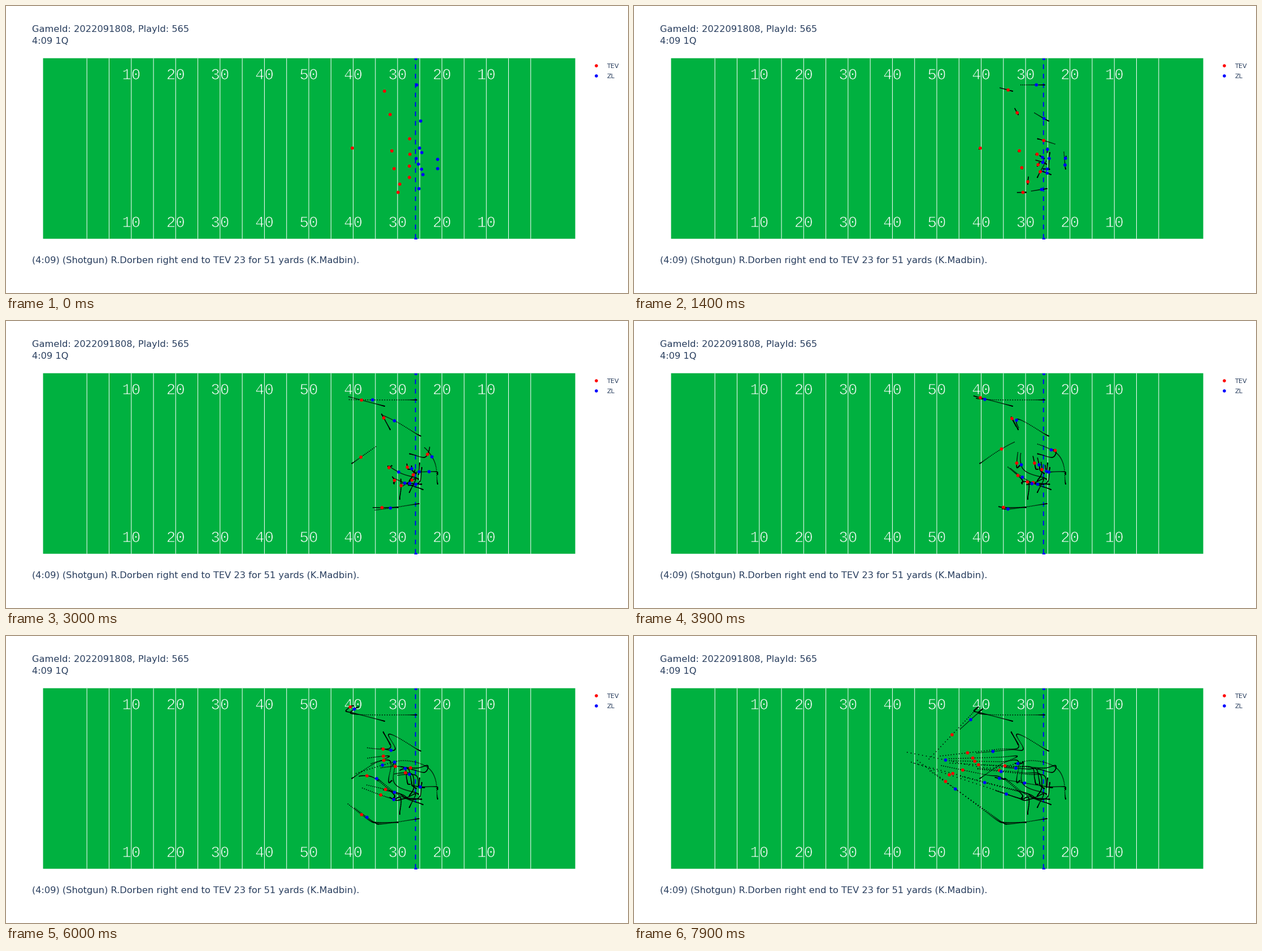
These frames come from a looping animation (1101x509 px, 8000 ms). A matplotlib script:

```python
import numpy as np
import matplotlib.pyplot as plt
from matplotlib.animation import FuncAnimation
from matplotlib.patches import Rectangle
from matplotlib.patheffects import Stroke

W, H, DPI = 1101, 509, 100
PX = 72 / DPI
FRAMES, SNAP, AHEAD = 80, 11, 10
RED, BLUE, INK, TURF = "#ff0000", "#0000ff", "#2a3f5f", "#00b140"
LEFT, RIGHT, TOP, BOTTOM = 65.6, 1007.6, 92.6, 412.8
MIDFIELD, FIVE_YARDS = 536, 39.28
SCRIMMAGE = 724.8
FINISH = np.array([551.5, 220])  # where the ball carrier ends up
LANE = np.array([1, 0.65])       # pursuers partly keep their lane
GAP = np.array([4, 1.5])         # half the space between two blockers

players = []


def hermite(knots):
    """Smooth path through {frame: (x, y)}, starting from rest."""
    t = np.array(sorted(knots), float)
    p = np.array([knots[k] for k in sorted(knots)], float)
    m = np.gradient(p, t, axis=0)
    m[0] = 0
    f = np.arange(FRAMES)
    i = np.clip(np.searchsorted(t, f, side="right") - 1, 0, len(t) - 2)
    h = (t[i + 1] - t[i])[:, None]
    u = (f[:, None] - t[i][:, None]) / h
    return ((2 * u**3 - 3 * u**2 + 1) * p[i] + (u**3 - 2 * u**2 + u) * h * m[i]
            + (3 * u**2 - 2 * u**3) * p[i + 1] + (u**3 - u**2) * h * m[i + 1])


def player(color, start, stops, pace):
    """Ease off the line, run through the stops, then chase the carrier."""
    start = np.array(start, float)
    first, last = min(stops), max(stops)
    knots = {0: start, **stops}
    knots[SNAP] = start + (SNAP / first) ** 2 * (stops[first] - start)
    chase = pace * LANE * (FINISH - stops[last])
    left = FRAMES - 1 - last
    knots[last + round(0.6 * left)] = stops[last] + 0.43 * chase
    knots[FRAMES - 1] = stops[last] + chase
    players.append((color, hermite(knots)))


def duel(red, blue, paces, meets):
    """A defender and a blocker who stay together at the meeting points."""
    for color, start, side, pace in zip((RED, BLUE), (red, blue), (-1, 1), paces):
        stops = {k: np.add(p, side * GAP) for k, p in meets.items()}
        player(color, start, stops, pace)


def solo(color, start, pace, stops):
    player(color, start, {k: np.array(p) for k, p in stops.items()}, pace)


duel((670, 151), (727, 140), (0.8, 0.32),
     {39: (617, 137.5), 51: (605.5, 134.5), 62: (613, 128)})
duel((680, 192.5), (734, 204), (0.7, 0.39), {39: (673, 174.5), 51: (685, 198)})
duel((683, 257), (730, 280.5), (0.6, 0.07), {39: (681.5, 253.5), 51: (685, 225)})
duel((715, 263), (726, 270.5), (0.62, 0.23),
     {22: (715.5, 264), 39: (713, 253.5), 51: (709, 235.5)})
duel((714, 284), (732, 252), (0.43, 0.44), {39: (726, 265), 51: (723, 247)})
duel((687, 288.5), (738, 299), (0.7, 0.13), {39: (683.5, 275.5), 51: (657, 254)})
duel((714, 304), (736, 260), (0.91, 0.54),
     {22: (729, 282.5), 39: (710.5, 288), 51: (698, 280)})
duel((697, 316), (735.5, 289.5), (0.95, 0.24), {39: (700.5, 287), 51: (689, 290)})
duel((694, 330.5), (731, 324), (1, 0.83), {39: (658, 332), 51: (649.5, 330)})
solo(RED, (714.5, 235.5), 0.41,
     {22: (739.5, 242), 39: (745.5, 229.5), 51: (729.5, 234)})
solo(RED, (613, 252), 0.62,
     {22: (614, 251.5), 39: (650.5, 227), 51: (678, 214)})
solo(BLUE, (764, 272), 0.26,
     {22: (762.5, 267.5), 39: (734.5, 268), 51: (740.5, 269)})
players.append((BLUE, hermite({
    0: (764, 288.5), 14: (763, 282), 22: (761, 258), 39: (738.5, 228.5),
    51: (703, 221), 68: (625, 234), FRAMES - 1: FINISH})))
players.sort(key=lambda p: p[0] == BLUE)

fig = plt.figure(figsize=(W / DPI, H / DPI), dpi=DPI, facecolor="white")
ax = fig.add_axes([0, 0, 1, 1])
ax.set_xlim(0, W)
ax.set_ylim(H, 0)
ax.axis("off")


def label(x, y, text, size, color=INK, **style):
    style = {"family": "DejaVu Sans", **style}
    ax.text(x, y, text, size=size * PX, color=color, va="baseline", zorder=3,
            **style)


field = Rectangle((LEFT, TOP), RIGHT - LEFT, BOTTOM - TOP, fc=TURF, lw=0,
                  snap=False)
ax.add_patch(field)
thin = [Stroke(linewidth=0.8 * PX, foreground=TURF)]
for i in range(21):
    x = MIDFIELD + FIVE_YARDS * (i - 10)
    ax.plot([x, x], [TOP, BOTTOM], color="white", lw=PX, zorder=2,
            solid_capstyle="butt", snap=False)
    if i % 2 == 0 and 0 < i < 20:
        yards = 50 - 5 * abs(i - 10)
        for y in (130, 392):
            label(x, y, str(yards), 27.5, "white", family="Liberation Mono",
                  ha="center", path_effects=thin)

line, = ax.plot([SCRIMMAGE] * 2, [BOTTOM, TOP], color=BLUE, lw=1.9 * PX,
                ls=(0, (4.4, 4.4)), marker="o", ms=5.5 * PX, mew=0, zorder=4,
                snap=False)
line.set_clip_path(field)

label(46, 46.3, "GameId: 2022091808, PlayId: 565", 16.2)
label(46, 66.8, "4:09 1Q", 16.2)
label(46, 455.8, "(4:09) (Shotgun) R.Dorben right end to TEV 23 "
                 "for 51 yards (K.Madbin).", 16.2)
label(1063, 110, "TEV", 11.3)
label(1063, 128, "ZL", 11.3)
ax.scatter([1045, 1045], [106, 124], s=(5.6 * PX) ** 2, c=[RED, BLUE], lw=0)

dots = ax.scatter([], [], lw=0, zorder=5)
STEPS = np.arange(1, AHEAD + 1)[:, None]


def trail(path, k):
    """Every past position plus a forecast from speed and turn."""
    now, before, earlier = path[k], path[max(k - 3, 0)], path[max(k - 6, 0)]
    speed = (now - before) / 3
    turn = (now - 2 * before + earlier) / 9
    ahead = now + speed * STEPS + 0.25 * turn * STEPS**2
    return np.vstack([path[:k + 1], ahead])


def draw(k):
    spots = [path[k] for _, path in players]
    crumbs = np.empty((0, 2))
    if k:
        crumbs = np.vstack([trail(path, k) for _, path in players])
    n = len(crumbs)
    dots.set_offsets(np.vstack([crumbs, spots]))
    dots.set_sizes(np.r_[np.full(n, (1.75 * PX) ** 2),
                         np.full(len(spots), (5.8 * PX) ** 2)])
    dots.set_facecolors(["black"] * n + [color for color, _ in players])
    return dots,


anim = FuncAnimation(fig, draw, frames=FRAMES, interval=100, repeat=True,
                     repeat_delay=0)
plt.show()
```
